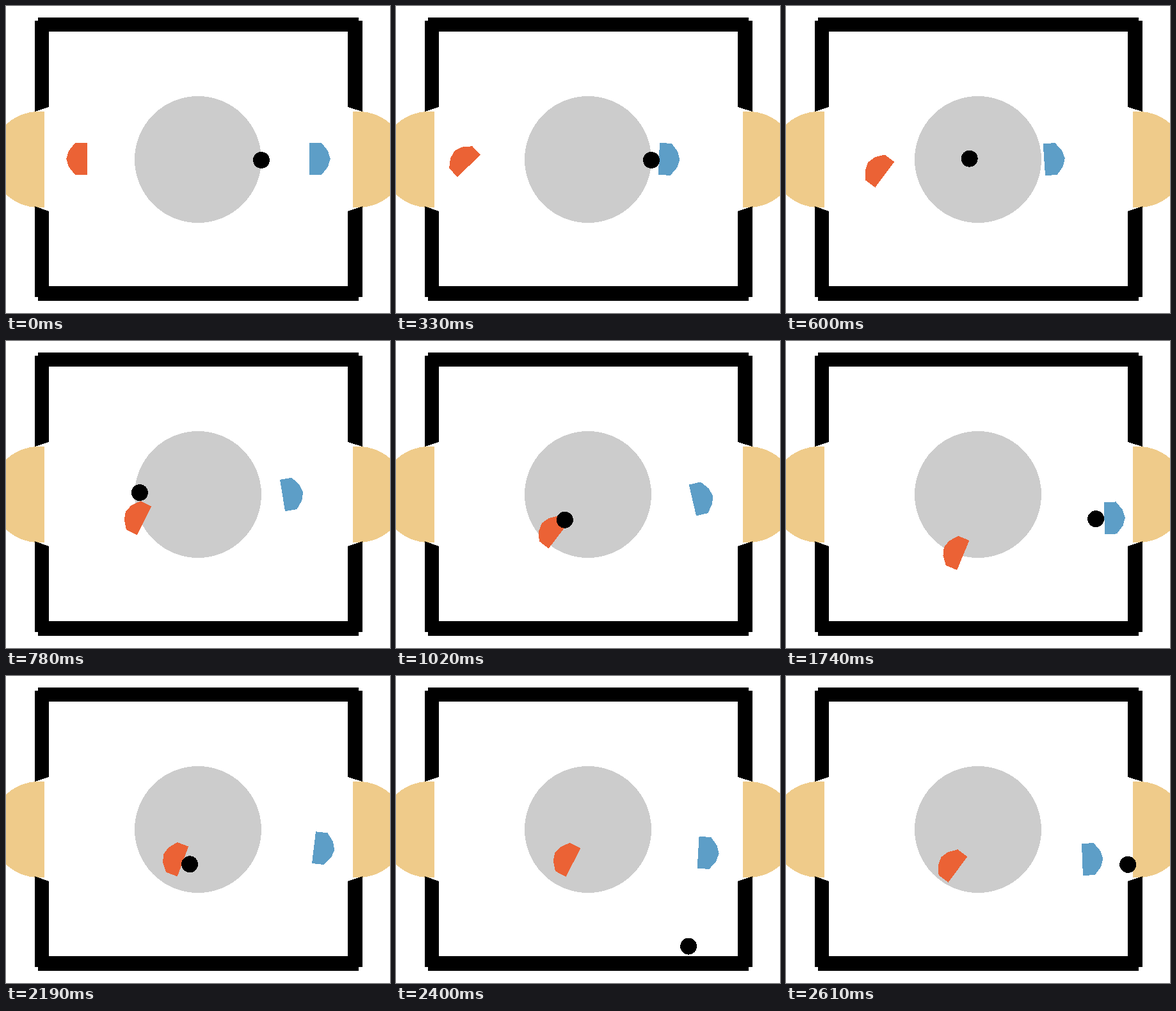
These frames come from a looping animation (600x480 px, 2640 ms). An HTML page:

```html
<!DOCTYPE html>
<html lang="en">
<head>
<meta charset="utf-8">
<title>Air hockey</title>
<style>
  html, body { margin: 0; width: 100%; height: 100%; overflow: hidden; background: #fff; }
  svg { display: block; width: 600px; height: 480px; }
</style>
</head>
<body>
<svg viewBox="0 0 600 480" shape-rendering="crispEdges">
  <circle cx="300" cy="240" r="99" fill="#ccc"/>
  <g fill="#efcb8a">
    <path d="M60 165.5A75 75 0 1 0 60 314.5Z"/>
    <path d="M542 165.5A75 75 0 1 1 542 314.5Z"/>
  </g>
  <path d="M50 18H551V40H50ZM50 438H551V461H50Z
           M45 23H67V158L45 165ZM45 313L67 321V455H45Z
           M534 23H557V165L534 158ZM534 321L557 313V455H534Z"/>
  <path id="red" fill="#eb6235" d="M6.25-25V25H-12.5L-22.5 12.5-26.25 0-22.5-12.5-12.5-25Z"/>
  <path id="blue" fill="#5d9ec7" d="M-6.25-25V25H12.5L22.5 12.5 26.25 0 22.5-12.5 12.5-25Z"/>
  <circle id="puck" r="13"/>
</svg>
<script>
const LOOP = 2640, STEP = 30;
const FLOOR = 425, BOUNCE = 0.96, GRIP = 0.45;

// Turning points of the players: time, x, y, angle
const red = [
  [0, 120.5, 239, 0], [330, 109.7, 245.5, 46.6], [540, 133, 255, 40],
  [780, 210.4, 278.2, 26.6], [1290, 264.6, 321, 52], [1740, 271, 332.6, 22.5],
  [1950, 243, 315, 20], [2190, 270.6, 287.8, 20.3], [2610, 263.5, 298.8, 36.6]
];
const blue = [
  [0, 480.5, 239, 0], [330, 417.2, 239.3, 2.3], [460, 401, 240, 0],
  [780, 438.2, 240.5, -9.3], [1290, 501.6, 260.1, -12.7], [1480, 517.5, 270, -8],
  [1740, 503.7, 276.8, -1.5], [2190, 487.2, 268.8, 6.9], [2610, 469.2, 286.7, -2.3]
];

// Hits that give the puck a new velocity in px per ms
const hits = [
  { at: 340, vx: -0.432, vy: -0.009 },
  { at: 780, vx: 0, vy: 0 },
  { at: 928, vx: 0.597, vy: 0.464 },
  { at: 1594, vx: -0.253, vy: -0.21 },
  { at: 1740, vx: -0.438, vy: 0.036 },
  { at: 2190, vx: 0.816, vy: 0.634 }
];

// Free flight between hits; the floor reflects the puck and slows it by friction
function rollPuck() {
  const path = [];
  let x = 399, y = 241, vx = 0, vy = 0;
  for (let t = 0; t < LOOP; t++) {
    const hit = hits.find(h => h.at === t);
    if (hit) ({ vx, vy } = hit);
    path.push([t, x, y]);
    x += vx;
    y += vy;
    if (y > FLOOR) {
      y = FLOOR - (y - FLOOR) * BOUNCE;
      vy *= -BOUNCE;
      vx *= GRIP;
    }
  }
  return path;
}
const puck = rollPuck();

// Tangent at a key, weighted by the neighbouring intervals
function slope(keys, i, k) {
  const rate = j => (keys[j + 1][k] - keys[j][k]) / (keys[j + 1][0] - keys[j][0]);
  if (i === 0) return 0;
  if (i === keys.length - 1) return rate(i - 1);
  const before = keys[i][0] - keys[i - 1][0], after = keys[i + 1][0] - keys[i][0];
  return (rate(i - 1) * after + rate(i) * before) / (before + after);
}

function glide(keys, t) {
  let i = 0;
  while (i < keys.length - 2 && t >= keys[i + 1][0]) i++;
  const a = keys[i], b = keys[i + 1];
  const h = b[0] - a[0], u = (t - a[0]) / h, w = 1 - u;
  return a.map((v, k) =>
    v * w * w * (1 + 2 * u) + b[k] * u * u * (3 - 2 * u) +
    h * u * w * (slope(keys, i, k) * w - slope(keys, i + 1, k) * u));
}

function place(id, [, x, y, angle = 0]) {
  document.getElementById(id).setAttribute('transform', `translate(${x} ${y}) rotate(${angle})`);
}

const start = performance.now();
function draw() {
  const t = Math.floor(((performance.now() - start) % LOOP) / STEP) * STEP;
  place('red', glide(red, t));
  place('blue', glide(blue, t));
  place('puck', puck[t]);
  requestAnimationFrame(draw);
}
draw();
</script>
</body>
</html>
```
